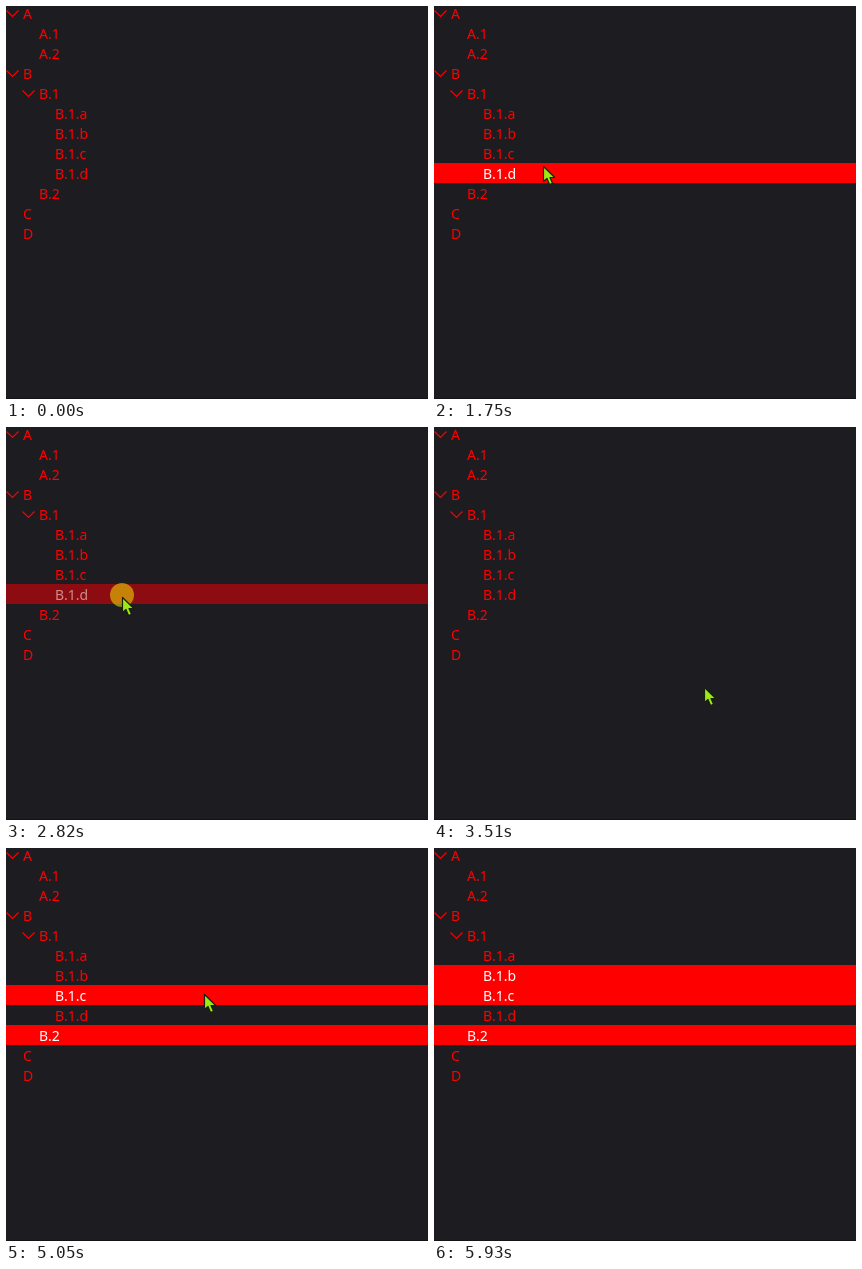
Write an HTML page with a canvas that moves like this. It is 422x393 px and loops after 6400 ms.

```html
<!DOCTYPE html>
<html>
<head>
<meta charset="utf-8">
<title>Tree selection</title>
<style>
html, body { margin: 0; width: 100%; height: 100%; overflow: hidden; background: #1d1c20; }
canvas { display: block; }
</style>
</head>
<body>
<canvas id="stage" width="422" height="393"></canvas>
<script>
const LOOP = 6400, W = 422, H = 393, ROW = 20, TOP = -3;
const ctx = document.getElementById('stage').getContext('2d');

// label, depth, expanded
const items = [
  ['A', 0, true], ['A.1', 1], ['A.2', 1],
  ['B', 0, true], ['B.1', 1, true],
  ['B.1.a', 2], ['B.1.b', 2], ['B.1.c', 2], ['B.1.d', 2],
  ['B.2', 1], ['C', 0], ['D', 0]
];

const looks = {
  off: { text: '#ff0000' },
  half: { fill: '#8c0c12', text: '#d08c8c' },
  on: { fill: '#ff0000', text: '#ffffff' }
};

// time, row, new look
const changes = [
  [1220, 8, 'on'], [2430, 8, 'half'], [2950, 8, 'off'],
  [4180, 9, 'on'], [4850, 7, 'on'], [5450, 6, 'on']
];

// press, release, centre
const clicks = [
  [1150, 1350, 109, 160], [2360, 2560, 116, 168], [2820, 2950, 116, 168],
  [4110, 4250, 197, 190], [4720, 4920, 197, 155], [5390, 5450, 197, 132]
];

// first step, last step, step count, waypoints
const moves = [
  [390, 880, 8, [[360, 410], [336, 384], [210, 285], [123, 205], [112, 170], [109, 160]]],
  [1750, 2030, 5, [[109, 160], [109, 160], [113, 161]]],
  [2360, 2430, 2, [[113, 161], [116, 170]]],
  [2950, 3450, 8, [[116, 170], [190, 250], [300, 364], [349, 337]]],
  [3510, 3720, 4, [[349, 337], [270, 260], [215, 215], [199, 195], [197, 191]]],
  [4250, 4450, 4, [[197, 191], [197, 158]]],
  [4650, 4650, 1, [[197, 158], [197, 153]]],
  [4980, 5250, 5, [[197, 153], [199, 155], [198, 146], [197, 139], [197, 135], [197, 133]]],
  [5590, 5930, 6, [[197, 133], [220, 165], [338, 300], [440, 420]]]
];

const arrow = [[0, 0], [0, 15], [3.5, 12], [6, 18], [9, 16.8], [6.5, 11], [11, 10.8]];

function along(points, u) {
  const p = u * (points.length - 1);
  const i = Math.min(Math.floor(p), points.length - 2);
  return [0, 1].map(k => points[i][k] + (points[i + 1][k] - points[i][k]) * (p - i));
}

function pointerAt(t) {
  const move = moves.filter(m => t >= m[0]).pop();
  if (!move) return null;
  const [start, end, count, points] = move;
  const step = t >= end ? count : 1 + Math.floor((t - start) / (end - start) * (count - 1));
  return along(points, step / count);
}

function trace(points) {
  ctx.beginPath();
  points.forEach(([x, y]) => ctx.lineTo(x, y));
}

function drawRow([label, depth, open], i, look) {
  const y = TOP + i * ROW, x = depth * 16;
  if (look.fill) {
    ctx.fillStyle = look.fill;
    ctx.fillRect(0, y, W, ROW);
  }
  if (open) {
    trace([[x + 0.5, y + 7.5], [x + 6.5, y + 13.5], [x + 12.5, y + 7.5]]);
    ctx.strokeStyle = look.text;
    ctx.lineWidth = 1.1;
    ctx.stroke();
  }
  ctx.fillStyle = look.text;
  ctx.fillText(label, x + 17, y + 16);
}

function drawPointer([x, y]) {
  ctx.save();
  ctx.translate(x + 0.5, y + 0.5);
  trace(arrow);
  ctx.closePath();
  ctx.fillStyle = '#9bea14';
  ctx.fill();
  ctx.strokeStyle = '#1a1f10';
  ctx.lineWidth = 1.2;
  ctx.lineJoin = 'round';
  ctx.stroke();
  ctx.restore();
}

function draw(t) {
  ctx.fillStyle = '#1d1c20';
  ctx.fillRect(0, 0, W, H);
  ctx.fillStyle = '#131215';
  ctx.fillRect(0, H - 1, W, 1);

  const state = items.map(() => 'off');
  for (const [time, row, look] of changes) if (t >= time) state[row] = look;
  ctx.font = '14px "Noto Sans", "Open Sans", sans-serif';
  items.forEach((item, i) => drawRow(item, i, looks[state[i]]));

  for (const [from, to, x, y] of clicks) {
    if (t < from || t >= to) continue;
    ctx.fillStyle = 'rgba(255, 245, 0, 0.5)';
    ctx.beginPath();
    ctx.arc(x, y, 12, 0, Math.PI * 2);
    ctx.fill();
  }

  const tip = pointerAt(t);
  if (tip) drawPointer(tip);
}

const begin = performance.now();
function tick() {
  draw((performance.now() - begin) % LOOP);
  requestAnimationFrame(tick);
}
tick();
</script>
</body>
</html>
```
